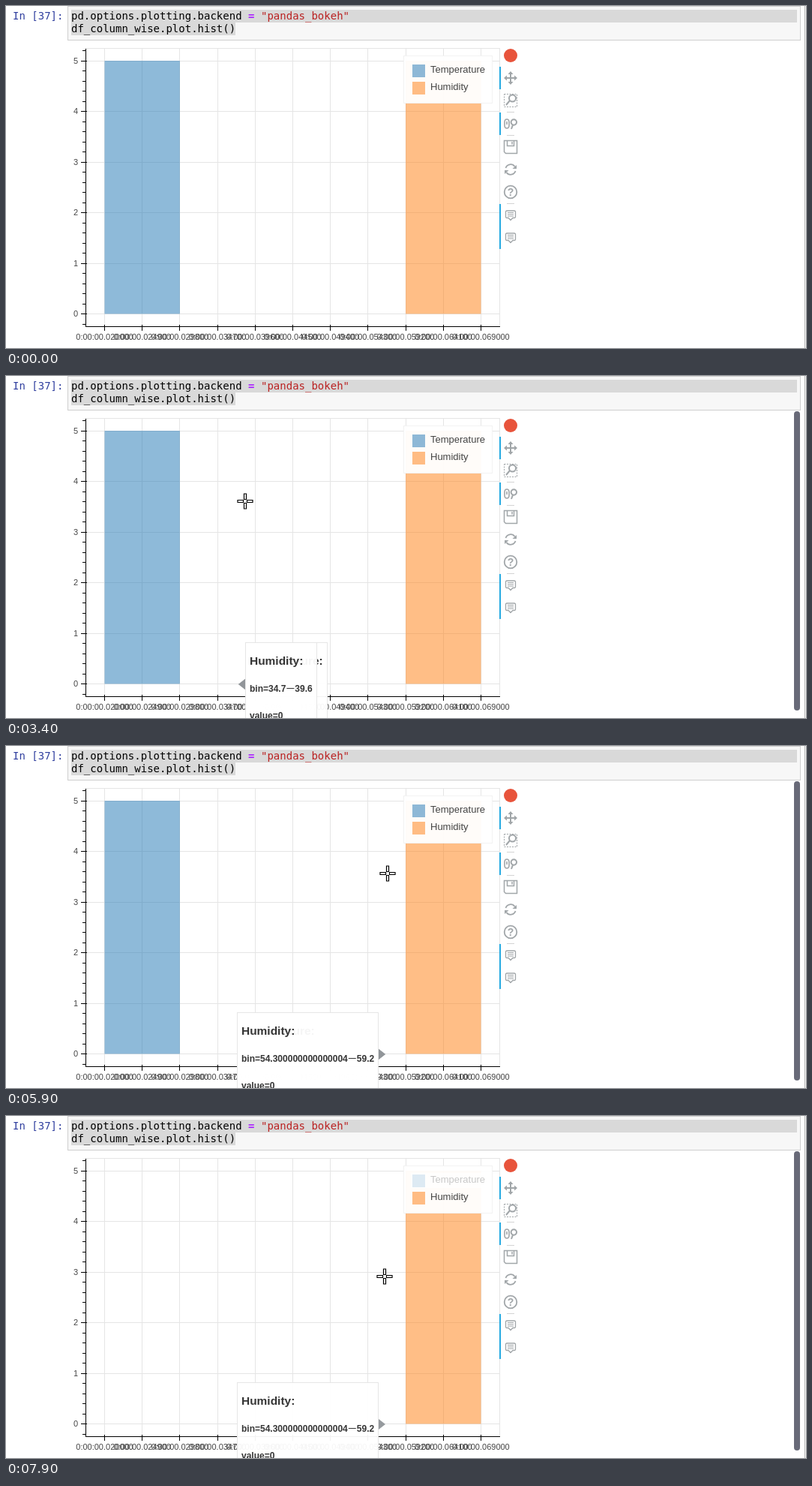
Write an HTML page with a canvas that moves like this. It is 1067x456 px and loops after 8000 ms.

```html
<!DOCTYPE html>
<html lang="en">
<head>
<meta charset="utf-8">
<title>Histogram hover</title>
<style>
html, body { margin: 0; width: 100%; height: 100%; overflow: hidden; background: #fff; }
canvas { display: block; }
</style>
</head>
<body>
<canvas id="stage" width="1067" height="456"></canvas>
<script>
const ctx = document.getElementById('stage').getContext('2d');
const SANS = '"Liberation Sans", Arial, sans-serif';
const MONO = '14px "DejaVu Sans Mono", monospace';
const BLUE = '#1f77b4', ORANGE = '#ff7f0e', GRID = '#e5e5e5', ICON = '#a1a6a9';
const LOOP = 8000, STEP = 100;
const LEFT = 131.5, BIN = 50.2, BASE = 410.5, UNIT = 67.5;

// Pointer path: time, x, y
const PATH = [
  [400, 70, 6], [1100, 184, 151], [1200, 193, 157], [1300, 195.5, 158.5], [1500, 195.5, 158.5],
  [2100, 259, 161], [2400, 289, 163], [2800, 312, 166], [3300, 312, 166], [4200, 373, 174],
  [5100, 426, 174], [6000, 519, 169], [6500, 553, 92], [6600, 554, 89], [7100, 554, 89],
  [7800, 508, 207], [7900, 505, 214]
];

function pointerAt(t) {
  const next = PATH.findIndex(p => p[0] >= t);
  if (next <= 0) return PATH[next ? PATH.length - 1 : 0].slice(1);
  const [t0, x0, y0] = PATH[next - 1], [t1, x1, y1] = PATH[next];
  const k = (t - t0) / (t1 - t0);
  return [x0 + (x1 - x0) * k, y0 + (y1 - y0) * k];
}

const inside = ([x, y], l, t, r, b) => x >= l && x < r && y >= t && y < b;
const inLegend = p => inside(p, 531, 67, 649, 129);
const inPlot = p => inside(p, 107, 57, 659, 428) && !inLegend(p);

function rect(x, y, w, h, color) {
  ctx.fillStyle = color;
  ctx.fillRect(x, y, w, h);
}
function frame(x, y, w, h, color) {
  ctx.strokeStyle = color;
  ctx.lineWidth = 1;
  ctx.strokeRect(x + .5, y + .5, w - 1, h - 1);
}
function text(str, x, y, font, color = '#444', align = 'left') {
  ctx.font = font;
  ctx.fillStyle = color;
  ctx.textAlign = align;
  ctx.fillText(str, x, y);
}
function shape(d, x, y, { fill, stroke, width = 1, dash = [] }) {
  const path = new Path2D(d);
  ctx.save();
  ctx.translate(x, y);
  ctx.setLineDash(dash);
  if (fill) { ctx.fillStyle = fill; ctx.fill(path); }
  if (stroke) { ctx.strokeStyle = stroke; ctx.lineWidth = width; ctx.stroke(path); }
  ctx.restore();
}

function drawCode() {
  rect(82, 0, 978, 46, '#f7f7f7');
  frame(82, 0, 978, 46, '#cfcfcf');
  rect(87, 5, 968, 17, '#d9d9d9');
  rect(87, 22, 219, 17, '#d9d9d9');
  text('In [37]:', 9, 18, MONO, '#303f9f');
  text('pd.options.plotting.backend', 87, 18, MONO, '#000');
  text('=', 323, 18, 'bold ' + MONO, '#aa22ff');
  text('"pandas_bokeh"', 340, 18, MONO, '#ba2121');
  text('df_column_wise.plot.hist()', 87, 35, MONO, '#000');
  rect(1065, 0, 1, 456, '#b0b0b0');
}

function drawBar(bin, color) {
  ctx.globalAlpha = .5;
  rect(LEFT + bin * BIN, BASE - 5 * UNIT, 2 * BIN, 5 * UNIT, color);
  ctx.globalAlpha = 1;
}

function drawPlot(showTemperature) {
  const font = '11px ' + SANS;
  frame(106, 56, 553, 372, GRID);
  for (let i = 0; i <= 10; i++) rect(Math.floor(LEFT + i * BIN), 57, 1, 371, GRID);
  for (let v = 0; v <= 5; v++) rect(107, Math.floor(BASE - v * UNIT), 552, 1, GRID);
  if (showTemperature) drawBar(0, BLUE);
  drawBar(8, ORANGE);

  rect(106, 57, 1, 371, '#000');
  rect(106, 427, 553, 1, '#000');
  for (let i = -1; i <= 26; i++) rect(102, Math.floor(BASE - i * UNIT / 5), 4, 1, '#000');
  for (let v = 0; v <= 5; v++) {
    const y = Math.floor(BASE - v * UNIT);
    rect(100, y, 8, 1, '#000');
    text(v, 96, y + 4, font, '#444', 'right');
  }
  for (let i = 0; i <= 10; i++) {
    const x = Math.floor(LEFT + i * BIN);
    rect(x, 425, 1, 8, '#000');
    text('0:00:00.0' + (20000 + 4900 * i), LEFT + i * BIN, 445, font, '#444', 'center');
  }
}

function drawLegend(showTemperature) {
  rect(530, 66, 119, 64, 'rgba(255,255,255,.95)');
  frame(530, 66, 119, 64, 'rgba(229,229,229,.5)');
  [['Temperature', BLUE], ['Humidity', ORANGE]].forEach(([name, color], i) => {
    ctx.globalAlpha = .5;
    rect(542, 78 + 23 * i, 17, 17, color);
    ctx.globalAlpha = 1;
    text(name, 566, 89 + 23 * i, '13px ' + SANS);
  });
  if (!showTemperature) rect(540, 76, 100, 20, 'rgba(255,255,255,.7)');
}

function drawToolbar() {
  const line = { stroke: ICON, width: 1.6 }, solid = { fill: ICON };
  const x = 673;
  for (const [y, h] of [[81, 30], [142, 30], [264, 60]]) rect(658, y, 2, h, '#26aae1');
  for (const y of [141, 172, 263]) rect(668, y, 10, 1, '#d3d3d3');

  shape('M9 0A9 9 0 1 1 -9 0A9 9 0 1 1 9 0', x, 66, { fill: '#e8543c' });
  // pan
  shape('M-7 0H7M0 -7V7', x, 96, { stroke: ICON, width: 2 });
  shape('M0 -9L3.5 -5H-3.5ZM0 9L3.5 5H-3.5ZM-9 0L-5 -3.5V3.5ZM9 0L5 -3.5V3.5Z', x, 96, solid);
  // box zoom
  shape('M-8.5 -8.5H8.5V8.5H-8.5Z', x, 126, { stroke: ICON, dash: [2, 1.5] });
  shape('M7 -3A4.5 4.5 0 1 1 -2 -3A4.5 4.5 0 1 1 7 -3M-1 0L-6 6', x, 126, { stroke: ICON, width: 2 });
  // wheel zoom
  shape('M-8 -2Q-8 -6 -5 -6T-2 -2V2Q-2 6 -5 6T-8 2ZM-5 -3V1', x, 157, line);
  shape('M8 -2A3.7 3.7 0 1 1 .6 -2A3.7 3.7 0 1 1 8 -2M3 1.5L1 7', x, 157, { stroke: ICON, width: 2 });
  // save
  shape('M-8.5 -8.5H8.5V8.5H-6.5L-8.5 6.5ZM-4.5 -8.5V-1.5H4.5V-8.5M2 -7V-3.5', x, 188, { stroke: ICON, width: 1.5 });
  // reset
  shape('M-6.5 -2A6.8 6.8 0 0 1 5.5 -4M6.5 2A6.8 6.8 0 0 1 -5.5 4', x, 218, { stroke: ICON, width: 1.8 });
  shape('M8 -6V-1H2.5ZM-8 6V1H-2.5Z', x, 218, solid);
  // help
  shape('M8.3 0A8.3 8.3 0 1 1 -8.3 0A8.3 8.3 0 1 1 8.3 0', x, 248, { stroke: ICON, width: 1.8 });
  text('?', x, 253, 'bold 14px ' + SANS, ICON, 'center');
  // hover
  for (const y of [279, 309]) {
    shape('M-5 -6H5Q6.5 -6 6.5 -4.5V2Q6.5 3.5 5 3.5H3L0 6.5L-3 3.5H-5Q-6.5 3.5 -6.5 2V-4.5Q-6.5 -6 -5 -6Z', x, y, { stroke: ICON, width: 1.3 });
    shape('M-4 -3.5H4M-4 -1.2H4M-4 1.1H4', x, y, { stroke: ICON });
  }
}

function edgeLabel(i) {
  const v = 20 + i * 4.9;
  return Number.isInteger(v) ? v + '.0' : String(v);
}

function drawTooltip(name, bin, value) {
  const titleFont = 'bold 15.48px ' + SANS, font = 'bold 12px ' + SANS, ink = '#2b2b2b';
  const title = name + ':', from = 'bin=' + edgeLabel(bin), to = edgeLabel(bin + 1);
  ctx.font = titleFont;
  const titleWidth = ctx.measureText(title).width;
  ctx.font = font;
  const fromWidth = ctx.measureText(from).width;
  const width = Math.round(Math.max(titleWidth, fromWidth + 12 + ctx.measureText(to).width) + 12);
  const center = LEFT + (bin + .5) * BIN, flipped = center > 382;
  const x = flipped ? Math.round(center - 11) - width : Math.round(center + 11.5);
  const mid = Math.round(BASE - value * UNIT / 2), top = mid - 56;

  ctx.globalAlpha = .95;
  shape('M0 -7L9 0L0 7Z', x + width, mid, { fill: flipped && '#909599' });
  shape('M0 -7L-9 0L0 7Z', x, mid, { fill: !flipped && '#909599' });
  rect(x, top, width, 112, '#fff');
  frame(x, top, width, 112, GRID);
  text(title, x + 6, top + 30, titleFont, ink);
  text(from, x + 6, top + 66, font, ink);
  rect(x + 7 + fromWidth, top + 61, 10, 1, ink);
  text(to, x + 18 + fromWidth, top + 66, font, ink);
  text('value=' + value, x + 6, top + 102, font, ink);
  ctx.globalAlpha = 1;
}

const CURSORS = {
  cross: 'M-1.5 -10H1.5V-2.5H-1.5ZM-1.5 2.5H1.5V10H-1.5ZM-10 -1.5H-2.5V1.5H-10ZM2.5 -1.5H10V1.5H2.5Z',
  hand: 'M-2 8V0Q-.5 -2 1 0V5L4 5.5L8 7Q9.5 7.5 9.5 9V12L8.5 15H0L-2 12L-5.5 9Q-6 6.5 -4 7Z',
  beam: 'M-4 -8H4V-6H1V6H4V8H-4V6H-1V-6H-4Z',
  arrow: 'M0 0V16L4 12.5L6.5 18L9 17L6.5 11.5H11.5Z'
};
function drawPointer(p) {
  const kind = inLegend(p) ? 'hand' : inPlot(p) ? 'cross' : inside(p, 82, 0, 1060, 46) ? 'beam' : 'arrow';
  shape(CURSORS[kind], Math.round(p[0]), Math.round(p[1]), { fill: '#fff', stroke: '#000', width: 1.2 });
}

function draw(t) {
  const showTemperature = t < 7100;
  rect(0, 0, 1067, 456, '#fff');
  drawCode();
  drawPlot(showTemperature);
  drawLegend(showTemperature);
  drawToolbar();
  if (t < PATH[0][0]) return;

  // tooltips trail the pointer slightly
  const hover = pointerAt(t - STEP / 2);
  const bin = Math.floor((hover[0] - LEFT) / BIN);
  if (inPlot(hover) && bin >= 0 && bin < 10) {
    if (showTemperature) drawTooltip('Temperature', bin, bin < 2 ? 5 : 0);
    drawTooltip('Humidity', bin, bin > 7 ? 5 : 0);
    ctx.fillStyle = '#686a78';
    ctx.beginPath();
    ctx.roundRect(1051, 47, 8, 399, 4);
    ctx.fill();
  }
  drawPointer(pointerAt(t));
}

const start = performance.now();
function tick() {
  const t = (performance.now() - start) % LOOP;
  draw(Math.floor(t / STEP) * STEP);
  requestAnimationFrame(tick);
}
tick();
</script>
</body>
</html>
```
